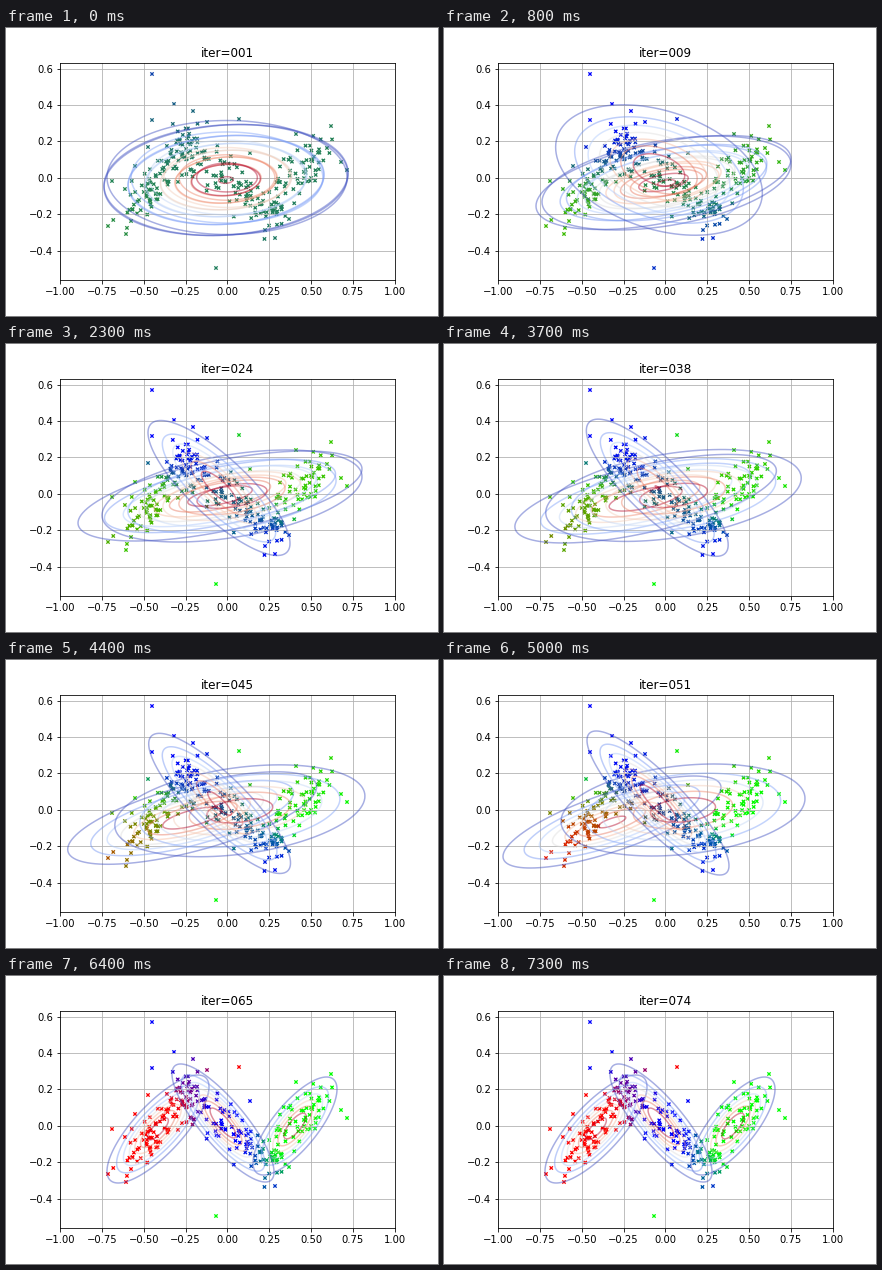
These frames come from a looping animation (432 px wide and 288 px high, 7400 ms). A matplotlib script:

```python
import numpy as np
import matplotlib.pyplot as plt
from matplotlib.animation import FuncAnimation
from matplotlib.collections import LineCollection
from matplotlib.ticker import MaxNLocator

FRAMES, INTERVAL = 74, 100
XLIM, YLIM = (-1, 1), (-0.5618, 0.6335)
SX, SY = 334.8 / 2, 217.44 / (YLIM[1] - YLIM[0])  # pixels per data unit
NICE = MaxNLocator(8)
ANGLE = np.linspace(0, 2 * np.pi, 121)

# Outer ring at each stage: centre x, y, half width, half height (px), correlation
RED = [(220, 152, 122, 55.5, .13), (219.5, 154.5, 127.5, 47, .5),
       (214, 152, 142, 45, .6), (168, 162, 109, 46, .75), (152, 153, 51, 54, .78)]
GREEN = [(220, 152, 122, 55.5, .1), (222.5, 155, 124.5, 47, .4),
         (226, 152, 130, 46, .42), (239, 150, 122, 46, .25), (289, 150, 42, 49, .75)]
BLUE = [(221, 149.5, 120, 57, 0), (215, 142, 103, 65, -.35),
        (213, 144, 71, 67.5, -.82), (214, 143, 70, 71, -.87), (217, 147, 51, 59, -.83)]
STAGES = [0, 8, 23, 50]
ENDS = [57, 63, 64]
POWERS = [1, 0.6, 2, 1]  # easing between stages
SHARE_FROM, SHARE_TO = np.array([(.14, .5, .36), (.35, .3, .35)])

# Each cloud runs along a stroke: start, end, number of points
STROKES = [((114, 193), (186, 118), 80), ((168, 106), (274, 197), 115),
           ((264, 186), (318, 110), 72)]
STRAYS = [(146, 46), (168, 76), (146, 92), (187, 83), (201, 94), (233, 91),
          (142, 119), (129, 138), (106, 153), (102, 198), (120, 206), (210, 240),
          (269, 210), (259, 202), (283, 191), (290, 106), (325, 98), (335, 134),
          (341, 142), (244, 125)]


def to_data(x, y):
    return (x - 54) / SX - 1, YLIM[1] - (y - 34.56) / SY


def gauss_peak(vx, vy, cov):
    return 1 / (2 * np.pi * np.sqrt(vx * vy - cov ** 2))


def density_levels(peak):
    levels = NICE.tick_values(0, peak)
    return levels[(levels > 0) & (levels < peak)]


def to_gauss(cx, cy, hw, hh, rho):
    """Mean and covariance whose lowest contour is this ellipse."""
    w, h = hw / SX, hh / SY
    shape = np.array([w * w, h * h, rho * w * h])
    r2 = 4.0
    for _ in range(12):
        peak = gauss_peak(*shape / r2)
        r2 = 2 * np.log(peak / density_levels(peak)[0])
    return (*to_data(cx, cy), *shape / r2)


TRACKS = [np.array([to_gauss(*key) for key in keys]) for keys in (RED, GREEN, BLUE)]


def gauss_at(i, track, end):
    times = STAGES + [end]
    i = min(i, end - 1e-6)
    s = np.searchsorted(times, i, "right") - 1
    k = ((i - times[s]) / (times[s + 1] - times[s])) ** POWERS[s]
    return track[s] + k * (track[s + 1] - track[s])


def shares_at(i):
    k = np.clip((i - 42) / 18, 0, 1)
    return SHARE_FROM + k * k * (3 - 2 * k) * (SHARE_TO - SHARE_FROM)


def make_points():
    rng = np.random.default_rng(12)
    parts = [np.array(STRAYS, float)]
    for start, end, count in STROKES:
        t = rng.beta(1.5, 1.5, (count, 1))
        noise = np.clip(rng.normal(size=(count, 2)), -2, 2) * (9, 11)
        parts.append(start + t * np.subtract(end, start) + noise)
    return np.column_stack(to_data(*np.vstack(parts).T))


def pdf(points, mx, my, vx, vy, cov):
    u, v = points[:, 0] - mx, points[:, 1] - my
    q = (vy * u * u + vx * v * v - 2 * cov * u * v) / (vx * vy - cov ** 2)
    return gauss_peak(vx, vy, cov) * np.exp(-q / 2)


def rings(mx, my, vx, vy, cov):
    peak = gauss_peak(vx, vy, cov)
    levels = density_levels(peak)
    axes = np.linalg.cholesky([[vx, cov], [cov, vy]])
    circle = np.column_stack((np.cos(ANGLE), np.sin(ANGLE))) @ axes.T
    paths = [(mx, my) + r * circle for r in np.sqrt(2 * np.log(peak / levels))]
    return paths, plt.cm.coolwarm(np.linspace(0, 1, len(levels)), alpha=0.45)


points = make_points()
fig, ax = plt.subplots(figsize=(6, 4), dpi=72)
fig.subplots_adjust(left=0.125, right=0.9, bottom=0.125, top=0.88)
ax.set(xlim=XLIM, ylim=YLIM)
ax.grid(True)
marks = ax.scatter(*points.T, s=11, marker="x", linewidths=1.3,
                   c=[(0, 0, 0)] * len(points))
contours = LineCollection([], linewidths=1.5, zorder=2)
ax.add_collection(contours, autolim=False)
title = ax.set_title("iter=001")


def update(i):
    gausses = [gauss_at(i, track, end) for track, end in zip(TRACKS, ENDS)]
    weights = np.column_stack([s * pdf(points, *g)
                               for s, g in zip(shares_at(i), gausses)])
    marks.set_color(weights / weights.sum(axis=1, keepdims=True))
    paths, colors = zip(*(rings(*g) for g in gausses))
    contours.set_segments(sum(paths, []))
    contours.set_color(np.vstack(colors))
    title.set_text(f"iter={i + 1:03d}")
    return marks, contours, title


anim = FuncAnimation(fig, update, frames=FRAMES, interval=INTERVAL,
                     repeat=True, repeat_delay=0)
plt.show()
```
